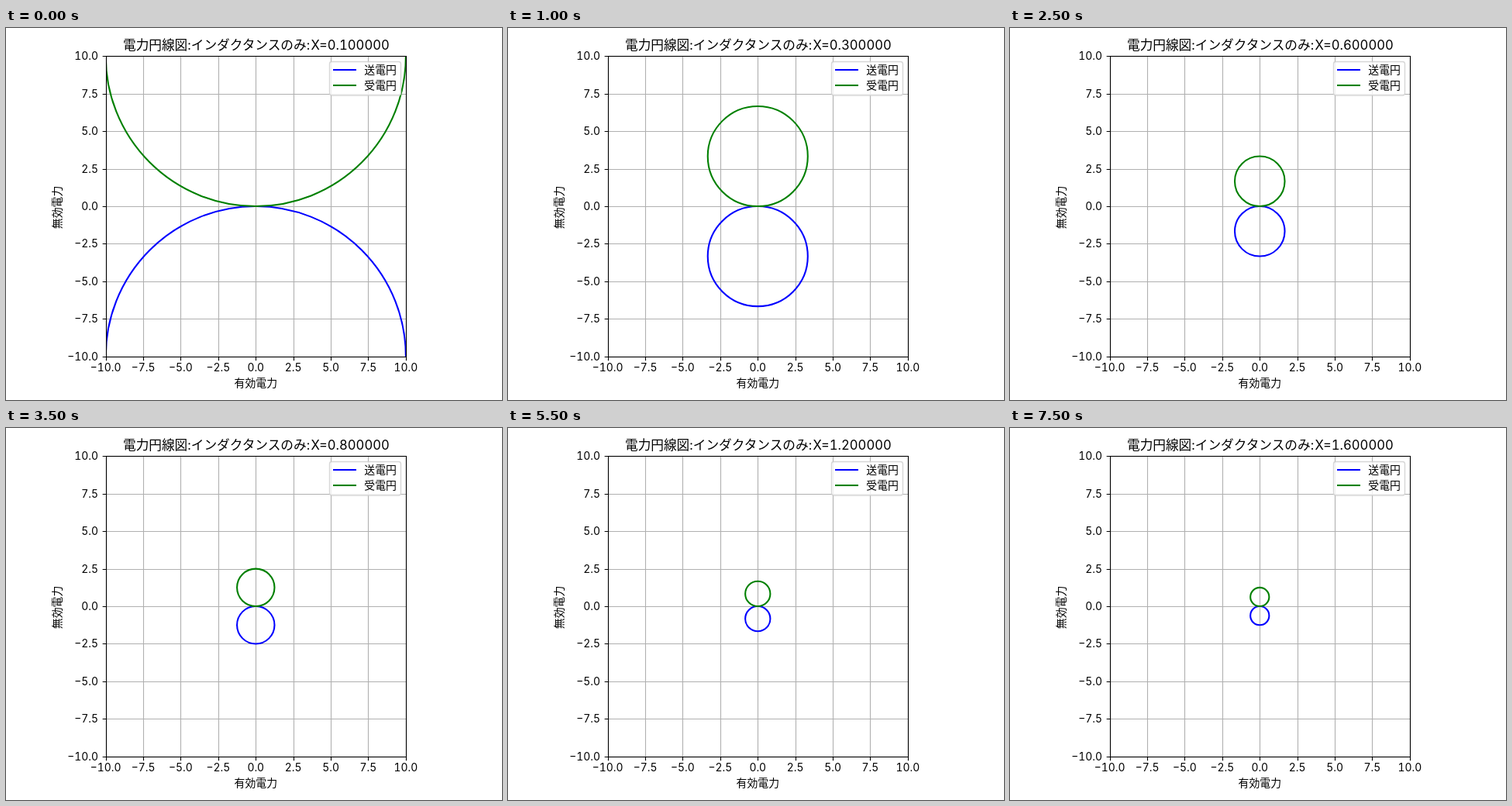
These frames come from a looping animation (640 by 480 pixels, 8 s). An HTML page:

```html
<!DOCTYPE html>
<html lang="ja">
<head>
<meta charset="utf-8">
<title>電力円線図</title>
<style>
  html, body { margin: 0; width: 100%; height: 100%; overflow: hidden; background: #fff; }
  svg { display: block; width: 640px; height: 480px; }
  text {
    font: 13.89px Inter, "Noto Sans CJK JP", "Noto Sans CJK", sans-serif;
    font-feature-settings: "tnum";
    fill: #000;
  }
  .title { font-size: 16.67px; }
  .mid { text-anchor: middle; }
  .end { text-anchor: end; }
  #grid { stroke: #b0b0b0; stroke-width: 1.11; }
  #ticks, #frame { stroke: #000; stroke-width: 1.11; fill: none; }
  .curve { fill: none; stroke-width: 2.08; }
  .send { stroke: #00f; }
  .receive { stroke: #008000; }
</style>
</head>
<body>
<svg viewBox="0 0 640 480">
  <clipPath id="plot"><rect x="129" y="36.5" width="387.5" height="387.5"/></clipPath>
  <path id="grid"/>
  <path id="ticks"/>
  <g clip-path="url(#plot)">
    <circle id="send" class="curve send"/>
    <circle id="receive" class="curve receive"/>
  </g>
  <rect id="frame" x="129.5" y="36.5" width="387" height="388"/>
  <g id="labels"></g>

  <text class="title" x="151" y="27.8">電力円線図:インダクタンスのみ:</text>
  <text class="title end" id="value" x="494.8" y="28"></text>
  <text class="mid" x="322.3" y="463">有効電力</text>
  <text class="mid" transform="translate(71.3 231.5) rotate(-90)">無効電力</text>

  <rect x="417.5" y="43.5" width="92" height="43.5" rx="2.8" fill="#fff" fill-opacity=".8" stroke="#ccc" stroke-opacity=".8" stroke-width="1.39"/>
  <path class="curve send" d="M422 54H452"/>
  <path class="curve receive" d="M422 74H452"/>
  <text x="462.3" y="59">送電円</text>
  <text x="462.3" y="79">受電円</text>
</svg>
<script>
  const CX = 322.27, CY = 230.05, UNIT = 19.36;
  const STEP = 500, STEPS = 16;
  const $ = id => document.getElementById(id);
  const snap = v => Math.round(v) + 0.5;

  function addLabel(x, y, str, cls) {
    const el = document.createElementNS("http://www.w3.org/2000/svg", "text");
    el.setAttribute("x", x);
    el.setAttribute("y", y);
    el.setAttribute("class", cls);
    el.textContent = str;
    $("labels").append(el);
  }

  let grid = "", ticks = "";
  for (let v = -10; v <= 10; v += 2.5) {
    const x = snap(CX + v * UNIT), y = snap(CY - v * UNIT);
    const str = v.toFixed(1).replace("-", "−");
    grid += `M${x} 36.5V424.5M129.5 ${y}H516.5`;
    ticks += `M${x} 424.5v4.86M129.5 ${y}h-4.86`;
    addLabel(CX + v * UNIT, 443, str, "mid");
    addLabel(119, CY - v * UNIT + 5, str, "end");
  }
  $("grid").setAttribute("d", grid);
  $("ticks").setAttribute("d", ticks);

  // Both circles touch the origin; the radius is 1 / X.
  function setCircle(id, r, side) {
    const el = $(id);
    el.setAttribute("cx", CX);
    el.setAttribute("cy", CY + side * r);
    el.setAttribute("r", r);
  }

  let shown = -1;
  function draw(now) {
    const step = Math.floor(now / STEP) % STEPS;
    if (step !== shown) {
      shown = step;
      const reactance = (step + 1) / 10, r = UNIT / reactance;
      setCircle("send", r, 1);
      setCircle("receive", r, -1);
      $("value").textContent = "X=" + reactance.toFixed(6);
    }
    requestAnimationFrame(draw);
  }
  draw(0);
</script>
</body>
</html>
```
